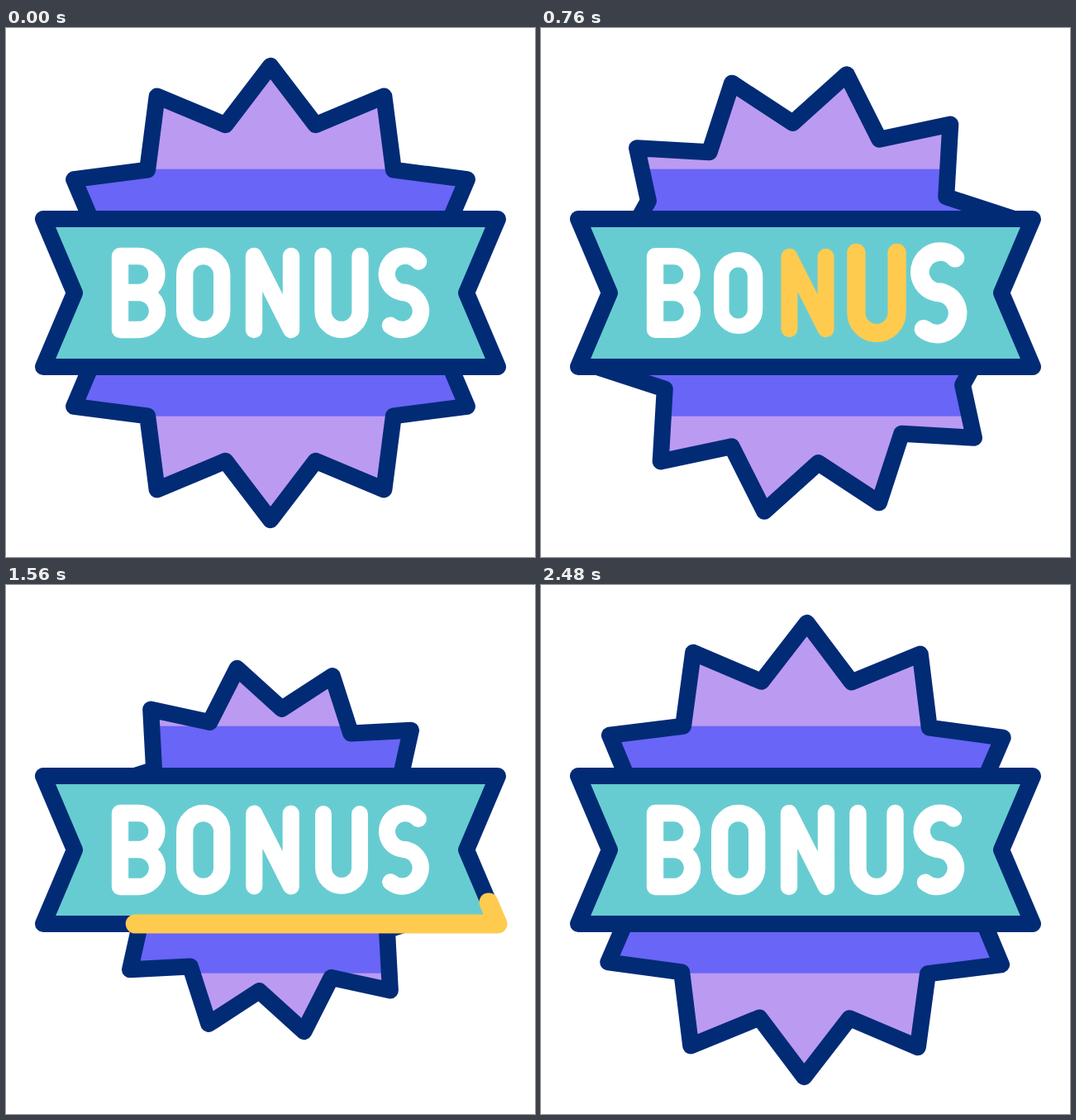
Recreate the animation shown at these times as an HTML page. Size 640 px wide and 640 px high, loop 2520 ms.

```html
<!DOCTYPE html>
<html lang="en">
<head>
<meta charset="utf-8">
<title>Bonus badge</title>
<style>
  html, body { margin: 0; width: 100%; height: 100%; overflow: hidden; background: #fff; }
  svg { display: block; width: 100%; height: 100%; }
  path { stroke-linecap: round; stroke-linejoin: round; }
  .line { fill: none; stroke: #022b76; stroke-width: 20; }
  #letters path { fill: none; stroke-width: 20.4; }
  #glow { fill: none; stroke: #ffcb4f; stroke-width: 23; }
</style>
</head>
<body>
<svg viewBox="0 0 640 640" role="img" aria-label="BONUS">
  <defs>
    <clipPath id="inside"><path class="star"/></clipPath>
  </defs>
  <g clip-path="url(#inside)">
    <rect width="640" height="640" fill="#bb9af2"/>
    <rect y="170.7" width="640" height="299" fill="#6965f7"/>
  </g>
  <path class="star line"/>
  <path class="banner line" style="fill:#67ccd1"/>
  <g id="letters"></g>
  <path id="glow" class="banner"/>
</svg>
<script>
const LOOP = 2520, CX = 320, CY = 320.5;
const WHITE = '#fff', GOLD = '#ffcb4f';

// Tables of [time, value], eased in and out between entries
const TURN = [[0, 0], [420, -13], [838, 13], [1250, 0], [1685, -13], [2120, 13], [2520, 0]];
const SIZE = [[0, 1], [420, .767], [838, 1], [1250, 1], [1685, .767], [2120, 1], [2520, 1]];
const BOUNCE = [[0, 1], [330, 1.12], [648, .905], [847, 1.06], [1160, .975], [1480, 1]];
const HEAD = [[1043, 0], [2194, 1]];
const TAIL = [[1321, 0], [2476, 1]];
const STAGGER = 120, GOLD_FROM = 333, GOLD_TO = 622;

// A quarter of the star as [angle, radius]; the side point hides behind the banner
const QUARTER = [[0, 274.7], [15, 210.5], [30, 274.7], [45, 210.5], [60, 274.7], [70.3, 225], [90, 237]];
const HALF = [...QUARTER, ...QUARTER.slice(1, -1).reverse().map(([a, r]) => [180 - a, r])];
const STAR = [...HALF, ...HALF.map(([a, r]) => [a + 180, r])];

// Each letter: horizontal centre and centre line
const LETTERS = [
  [160.5, 'M138 320V276H160.5a22 22 0 0 1 0 44H138V365H160.5a22.5 22.5 0 0 0 0 -45'],
  [238.7, 'M216.2 298.5a22.5 22.5 0 0 1 45 0V342.5a22.5 22.5 0 0 1 -45 0Z'],
  [322.5, 'M300 365V276L345 365V276'],
  [406, 'M383.5 276V342.5a22.5 22.5 0 0 0 45 0V276'],
  [482, 'M499 282.5A22.2 22.2 0 1 0 484 320H480A22.5 22.5 0 1 1 465 359.8']
];

function ease(keys, t) {
  if (t <= keys[0][0]) return keys[0][1];
  for (let i = 1; i < keys.length; i++) {
    const [t0, a] = keys[i - 1], [t1, b] = keys[i];
    if (t < t1) {
      const s = (t - t0) / (t1 - t0);
      return a + (b - a) * s * s * (3 - 2 * s);
    }
  }
  return keys[keys.length - 1][1];
}

function starPath(turn, size) {
  const points = STAR.map(([angle, radius]) => {
    const a = (angle + turn) * Math.PI / 180, r = radius * size;
    return (CX + r * Math.sin(a)).toFixed(2) + ' ' + (CY - r * Math.cos(a)).toFixed(2);
  });
  return 'M' + points.join('L') + 'Z';
}

const stars = document.querySelectorAll('.star');
const glow = document.getElementById('glow');
const group = document.getElementById('letters');

for (const el of document.querySelectorAll('.banner'))
  el.setAttribute('d', 'M595 231L557 320.5L595 410H45L83 320.5L45 231Z');
const length = glow.getTotalLength();

const glyphs = LETTERS.map(([x, d]) => {
  const el = document.createElementNS('http://www.w3.org/2000/svg', 'path');
  el.setAttribute('d', d);
  group.appendChild(el);
  return { el, x };
});

function draw(t) {
  const d = starPath(ease(TURN, t), ease(SIZE, t));
  stars.forEach(el => el.setAttribute('d', d));

  glyphs.forEach(({ el, x }, i) => {
    const p = t - i * STAGGER;
    const k = ease(BOUNCE, p);
    el.setAttribute('transform', `translate(${x} ${CY}) scale(${k}) translate(${-x} ${-CY})`);
    el.setAttribute('stroke', p >= GOLD_FROM && p < GOLD_TO ? GOLD : WHITE);
  });

  const head = ease(HEAD, t) * length, tail = ease(TAIL, t) * length;
  glow.style.display = head > tail ? '' : 'none';
  glow.setAttribute('stroke-dasharray', `${head - tail} ${length * 2}`);
  glow.setAttribute('stroke-dashoffset', -tail);
}

const start = performance.now();
function tick() {
  draw((performance.now() - start) % LOOP);
  requestAnimationFrame(tick);
}
tick();
</script>
</body>
</html>
```
